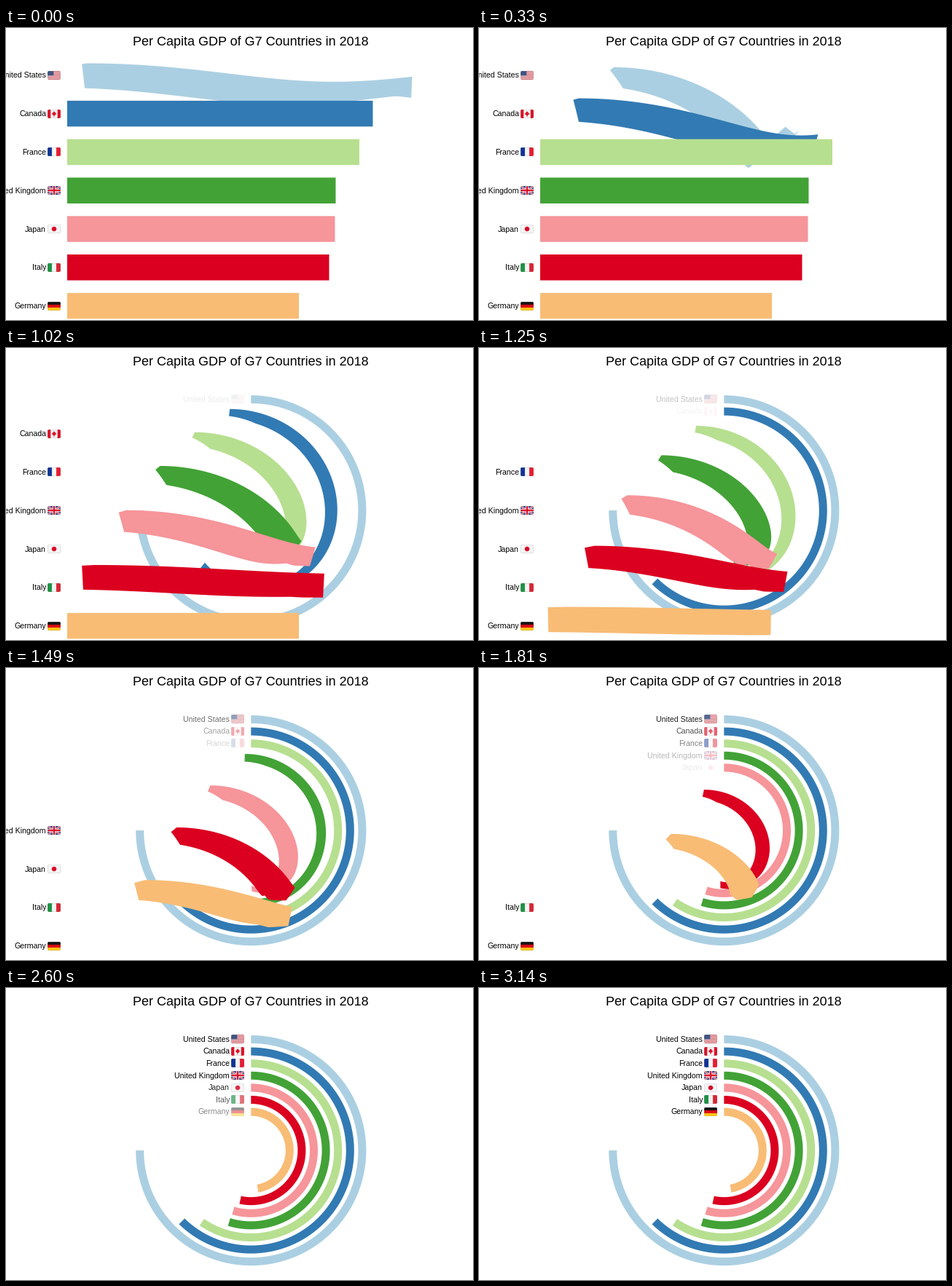
A matplotlib script that plays this animation: 641x401 px, repeating every 3690 ms.

```python
import numpy as np
import matplotlib.pyplot as plt
from matplotlib.animation import FuncAnimation
from matplotlib.patches import Polygon

W, H, DPI = 641, 401, 64
INTERVAL, FRAMES = 30, 123
STEP_MS, LAST_STEP = 78.4, 40
STAGGER = 0.2

CENTER = np.array([336.3, 223.1])
BAR_X, BAR_H, MAX_W = 84, 35.5, 505
RING_R, RING_GAP, RING_W = 152.6, 16.6, 11

ROWS = [
    ("United States", 505, "#abcfe2"),
    ("Canada", 419.5, "#327ab3"),
    ("France", 401, "#b7df90"),
    ("United Kingdom", 368.5, "#42a236"),
    ("Japan", 367.5, "#f6959a"),
    ("Italy", 359.5, "#db0020"),
    ("Germany", 318, "#f8bc75"),
]

plt.rcParams["font.family"] = "Liberation Sans"
plt.rcParams["text.hinting"] = "default"


def pt(px):
    return px * 72 / DPI


# ---- outlines and morphing -------------------------------------------------

def bar_outline(i, width):
    """Clockwise from the top left corner."""
    top = 64.8 + 52.8 * i - BAR_H / 2
    x1, bottom = BAR_X + width, top + BAR_H
    return np.array([[BAR_X, top], [x1, top], [x1, bottom], [BAR_X, bottom]])


def arc_outline(i, width):
    """Clockwise from the inner corner at twelve o'clock."""
    r = RING_R - RING_GAP * i
    a = np.linspace(0, np.radians(270 * width / MAX_W), 120)
    unit = np.column_stack([np.sin(a), -np.cos(a)])
    inner, outer = unit * (r - RING_W / 2), unit * (r + RING_W / 2)
    return CENTER + np.vstack([inner[:1], outer, inner[:0:-1]])


def close(ring):
    """Closed ring and the share of its length reached at each point."""
    ring = np.vstack([ring, ring[:1]])
    cum = np.concatenate([[0], np.cumsum(np.hypot(*np.diff(ring, axis=0).T))])
    return ring, cum / cum[-1]


class Morph:
    """Pairs points that lie at the same share of both outlines."""

    def __init__(self, i, width):
        bar, s_bar = close(bar_outline(i, width))
        arc, s_arc = close(arc_outline(i, width))
        s = np.union1d(s_bar, s_arc)
        self.a, self.b = (
            np.column_stack([np.interp(s, at, ring[:, j]) for j in (0, 1)])
            for ring, at in ((bar, s_bar), (arc, s_arc)))

    def at(self, p):
        return self.a + (self.b - self.a) * np.clip(p, 0, 1)


# ---- flags -----------------------------------------------------------------

FLAG_W, FLAG_H, SCALE = 17.5, 12, 12
X, Y = np.meshgrid((np.arange(int(FLAG_W * SCALE)) + 0.5) / SCALE - FLAG_W / 2,
                   (np.arange(FLAG_H * SCALE) + 0.5) / SCALE - FLAG_H / 2)
U, V = X / FLAG_W + 0.5, Y / FLAG_H + 0.5
WHITE = (246, 246, 246)


def flag_image(layers):
    img = np.ones(X.shape + (4,))
    img[..., :3] = np.array(WHITE) / 255
    for mask, color in layers:
        img[mask, :3] = np.array(color) / 255
    rad = 1.8
    dx = np.maximum(np.abs(X) - FLAG_W / 2 + rad, 0)
    dy = np.maximum(np.abs(Y) - FLAG_H / 2 + rad, 0)
    inset = np.minimum(np.minimum(FLAG_W / 2 - np.abs(X), FLAG_H / 2 - np.abs(Y)),
                       rad - np.hypot(dx, dy))
    img[inset < 0.8, :3] = img[inset < 0.8, :3] * 0.75 + 0.14
    img[..., 3] = inset >= 0
    return img


def tricolor(t, first, last):
    return [(t < 1 / 3, first), (t > 2 / 3, last)]


def flags():
    red, navy = (222, 18, 40), (24, 48, 130)
    diag = np.minimum(np.abs(Y - X * FLAG_H / FLAG_W),
                      np.abs(Y + X * FLAG_H / FLAG_W))
    leaf = ((np.abs(X) / 3 + np.abs(Y + 0.3) / 3.4 < 1)
            | ((np.abs(X) < 2.6) & (np.abs(Y - 0.2) < 0.8))
            | ((np.abs(X) < 0.4) & (Y > 0) & (Y < 4)))
    layers = [
        [((V * 13).astype(int) % 2 == 0, (205, 62, 75)),
         ((U < 0.46) & (V < 0.54), (66, 84, 130))],
        [(np.abs(U - 0.5) > 0.26, red), (leaf, red)],
        tricolor(U, (16, 52, 150), (230, 30, 52)),
        [(U >= 0, navy), (diag < 1.5, WHITE), (diag < 0.55, red),
         ((np.abs(X) < 2.1) | (np.abs(Y) < 2.1), WHITE),
         ((np.abs(X) < 1.2) | (np.abs(Y) < 1.2), red)],
        [(np.hypot(X, Y) < 3.2, (215, 10, 38))],
        tricolor(U, (30, 146, 70), (215, 38, 52)),
        [(V < 1 / 3, (20, 20, 20)), (V >= 1 / 3, (220, 10, 20)),
         (V > 2 / 3, (252, 200, 20))],
    ]
    return [flag_image(group) for group in layers]


# ---- scene -----------------------------------------------------------------

fig = plt.figure(figsize=(W / DPI, H / DPI), dpi=DPI, facecolor="white")
ax = fig.add_axes([0, 0, 1, 1])
ax.axis("off")

ax.text(336, 24.4, "Per Capita GDP of G7 Countries in 2018",
        fontsize=pt(18), ha="center", va="baseline")

shapes, names, icons, morphs = [], [], [], []
for i, ((name, width, color), image) in enumerate(zip(ROWS, flags())):
    morph = Morph(i, width)
    morphs.append(morph)
    shapes.append(ax.add_patch(Polygon(morph.a, fc=color, lw=0, snap=False,
                                       zorder=2 + i)))
    names.append(ax.text(0, 0, name, fontsize=pt(10.6), ha="right",
                         va="baseline", zorder=20))
    icons.append(ax.imshow(image, aspect="auto", zorder=20))

ax.set_xlim(0, W)
ax.set_ylim(H, 0)


def place_label(i, right, cy, alpha):
    names[i].set_position((right, cy + 3.5))
    names[i].set_alpha(alpha)
    x = right + 2
    icons[i].set_extent((x, x + FLAG_W, cy + FLAG_H / 2, cy - FLAG_H / 2))
    icons[i].set_alpha(alpha)


def clock(n):
    step = min(LAST_STEP, int((n * INTERVAL + 20) / STEP_MS))
    return np.interp(step, [0, 8, 13, 19, 23, 33, 40],
                     [0.08, 0.68, 1.08, 1.565, 1.883, 2.66, 3.22])


def update(n):
    now = clock(n)
    for i in range(len(ROWS)):
        p = now - STAGGER * i
        shapes[i].set_xy(morphs[i].at(p))
        if p < 1:
            place_label(i, 55, 64.8 + 52.8 * i, 1)
        else:
            place_label(i, 307, 70.4 + 16.55 * i, min(p - 1, 1))
    return shapes + names + icons


anim = FuncAnimation(fig, update, frames=FRAMES, interval=INTERVAL,
                     repeat=True, repeat_delay=0, blit=False)
plt.show()
```
